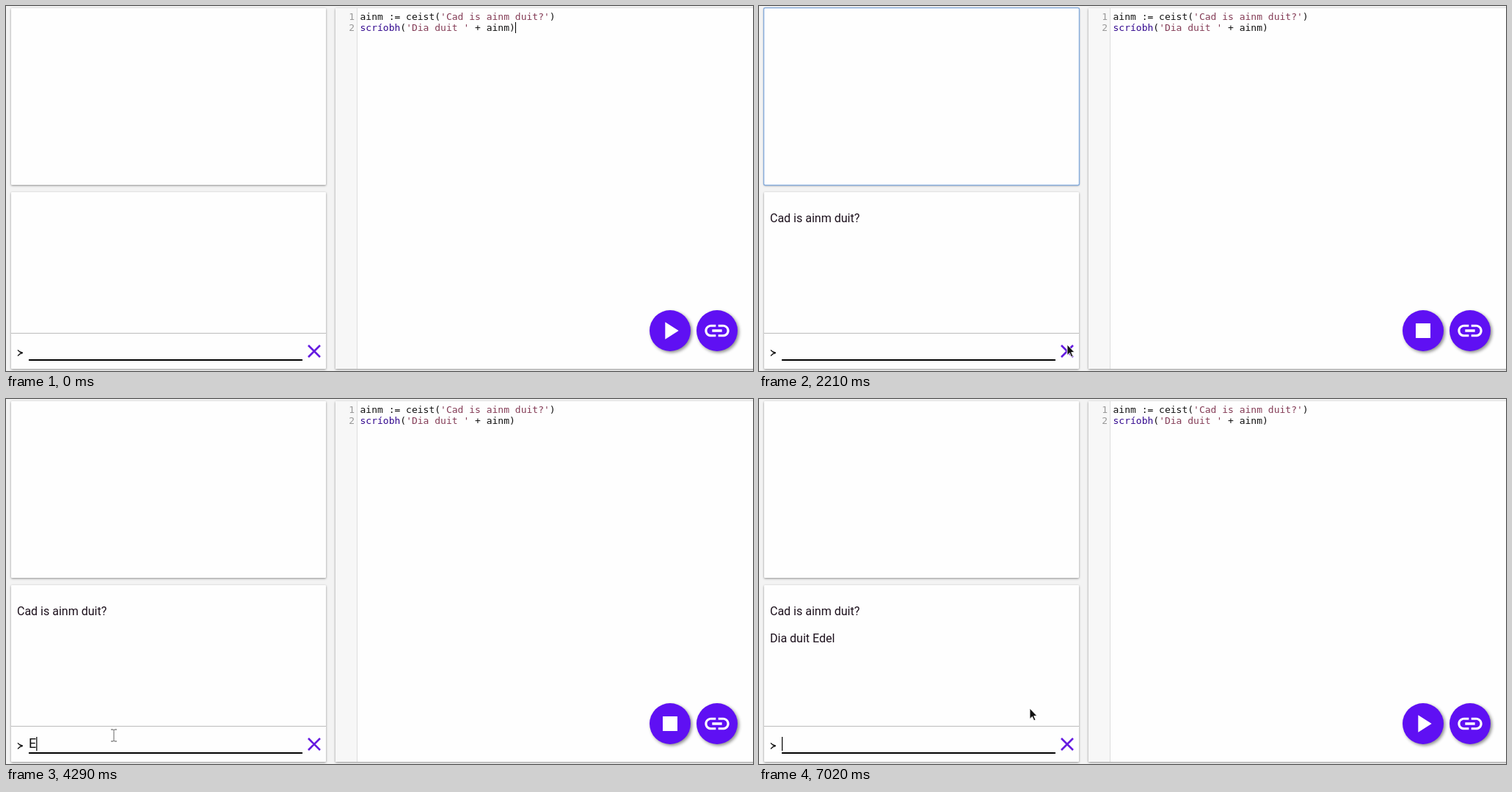
Animation of 1018 by 498 pixels, one loop 7.28 s. Source, as an HTML page:

```html
<!DOCTYPE html>
<html lang="ga">
<head>
<meta charset="utf-8">
<title>Code editor demo</title>
<style>
  html, body { margin: 0; width: 100%; height: 100%; overflow: hidden; background: #f3f3f3; }
  svg { display: block; width: 1018px; height: 498px; }
  .panel { fill: #fefefe; filter: drop-shadow(0 1px 1.5px rgba(0, 0, 0, .42)); }
  .code { font: 13px "DejaVu Sans Mono", monospace; fill: #111; }
  .num { fill: #999; text-anchor: end; }
  .str { fill: #843c56; }
  .fn { fill: #33098f; }
  .out { font: 16px Roboto, sans-serif; fill: #1c101c; }
  .in { font: 18px Roboto, sans-serif; fill: #111; }
  .btn circle { fill: #5f10f3; filter: drop-shadow(2px 2px 2px rgba(0, 0, 0, .45)); }
  .btn path { fill: #fff; }
  .btn.hover circle { fill: #9a44f3; }
  .btn.hover.run circle { fill: #8d40da; }
  .btn.hover.run path { fill: #e0e0e0; }
</style>
</head>
<body>
<svg viewBox="0 0 1018 498">
  <rect width="1018" height="498" fill="#f3f3f3"/>
  <rect class="panel" x="7" y="3" width="429" height="241" rx="1"/>
  <rect id="ring" x="6.5" y="2.5" width="430" height="242" rx="2" fill="none" stroke="#86acdc" stroke-width="1.4"/>
  <rect class="panel" x="7" y="254" width="429" height="241" rx="1"/>
  <rect class="panel" x="449" y="3" width="580" height="492" rx="1"/>

  <rect x="449" y="3" width="29" height="492" fill="#f7f7f7"/>
  <rect x="478" y="3" width="1" height="492" fill="#ddd"/>
  <g class="code">
    <text class="num" x="475" y="19">1</text>
    <text class="num" x="475" y="34">2</text>
    <text x="482.5" y="19">ainm := ceist(<tspan class="str">'Cad is ainm duit?'</tspan>)</text>
    <text x="482.5" y="34"><tspan class="fn">scríobh</tspan>(<tspan class="str">'Dia duit '</tspan> + ainm)</text>
  </g>
  <rect id="codeCaret" x="694" y="22" width="1" height="15"/>

  <text id="ask" class="out" x="15" y="295">Cad is ainm duit?</text>
  <text id="reply" class="out" x="15" y="332">Dia duit Edel</text>
  <rect x="7" y="446" width="429" height="1" fill="#bdbdbd"/>
  <path d="M16 469.3Q18.5 472.6 22.8 473.3Q18.5 474 16 477.3" fill="none" stroke="#111" stroke-width="1.4"/>
  <rect x="31" y="482" width="373" height="2"/>
  <text id="input" class="in" x="31" y="475.5"></text>
  <rect id="inputCaret" y="461" width="1.2" height="19"/>
  <path d="M412 463L428 479M428 463L412 479" stroke="#651be0" stroke-width="2.6"/>

  <g id="expand" class="btn" transform="translate(905 379)">
    <circle r="28"/>
    <path transform="scale(1.667) translate(-12 -12)" d="M7 14H5v5h5v-2H7v-3zm-2-4h2V7h3V5H5v5zm12 7h-3v2h5v-5h-2v3zM14 5v2h3v3h2V5h-5z"/>
  </g>
  <g id="play" class="btn" transform="translate(905 443)">
    <circle r="28"/>
    <path id="icon" transform="scale(1.667) translate(-12 -12)"/>
  </g>
  <g class="btn" transform="translate(969 443)">
    <circle r="28"/>
    <path transform="scale(1.667) translate(-12 -12)" d="M3.9 12c0-1.71 1.39-3.1 3.1-3.1h4V7H7c-2.76 0-5 2.24-5 5s2.24 5 5 5h4v-1.9H7c-1.71 0-3.1-1.39-3.1-3.1zM8 13h8v-2H8v2zm9-6h-4v1.9h4c1.71 0 3.1 1.39 3.1 3.1s-1.39 3.1-3.1 3.1h-4V17h4c2.76 0 5-2.24 5-5s-2.24-5-5-5z"/>
  </g>

  <g id="pointer">
    <path id="arrow" d="M0 0V14.5L3.4 11.4L5.7 16.8L8 15.8L5.7 10.6H10Z" fill="#111" stroke="#fff" stroke-width=".9"/>
    <path id="beam" d="M-4 -8H-1.5L0 -7L1.5 -8H4M0 -7V7M-4 8H-1.5L0 7L1.5 8H4" fill="none" stroke="#8a8a8a" stroke-width="1.3"/>
    <path id="hand" d="M-2 1Q-2 -.7 -.5 -.7Q1 -.7 1 1V6Q3.2 5 4 6.6Q6 6 6.6 7.6Q9 7.4 9 9.5V13Q9 15 7.6 16.5V19H-.5V17Q-3 14.5 -5 11Q-5.4 9 -3.6 9.2L-2 11Z" fill="#fff" stroke="#333" stroke-width="1.1"/>
  </g>
</svg>
<script>
const TICK = 130, TICKS = 56;
const PLAY = "M8 5v14l11-7z", STOP = "M6 6h12v12H6z";
const $ = id => document.getElementById(id);
const show = (id, on) => { $(id).style.display = on ? "" : "none"; };
const within = (t, ranges) => ranges.some(([from, to]) => t >= from && t < to);

// Pointer paths: [tick, x, y]; each path ends when the pointer hides.
const paths = [
  [[6, 770, 408], [7, 840, 430], [8, 880, 442], [10, 898, 449], [13, 898, 449],
   [14, 882, 452], [15, 800, 458], [16, 640, 462], [17, 420, 462], [18, 240, 460],
   [19, 147, 459], [36, 147, 459]],
  [[51, 180, 458], [52, 270, 446], [53, 335, 432], [54, 369, 422], [56, 369, 422]]
];
const typed = [[32, "E"], [36, "Ed"], [37, "Ede"], [38, "Edel"], [40, ""]];
const codeBlink = [[0, 1], [5, 9]];
const inputBlink = [[22, 24], [26, 31], [32, 46], [48, 51], [54, 56]];

function pointerAt(t) {
  const path = paths.find(p => t >= p[0][0] && t < p[p.length - 1][0]);
  if (!path) return null;
  const i = path.findIndex(p => p[0] > t);
  const [t0, x0, y0] = path[i - 1], [t1, x1, y1] = path[i];
  const k = (t - t0) / (t1 - t0);
  return { x: x0 + (x1 - x0) * k, y: y0 + (y1 - y0) * k };
}

function drawPointer(p, hover) {
  show("pointer", p);
  if (!p) return;
  const overText = p.x > 478 || (p.x > 31 && p.x < 404 && p.y > 456);
  const kind = hover ? "hand" : overText ? "beam" : "arrow";
  for (const id of ["hand", "beam", "arrow"]) show(id, id === kind);
  $("pointer").setAttribute("transform", `translate(${p.x} ${p.y})`);
}

function draw(t) {
  const p = pointerAt(t);
  const hover = !!p && Math.hypot(p.x - 905, p.y - 443) < 29;
  const running = within(t, [[11, 41]]);

  drawPointer(p, hover);
  show("expand", hover);
  $("play").classList.toggle("hover", hover);
  $("play").classList.toggle("run", running);
  $("icon").setAttribute("d", running ? STOP : PLAY);

  show("ring", within(t, [[11, 22]]));
  show("ask", t >= 12);
  show("reply", t >= 41);
  show("codeCaret", within(t, codeBlink));

  const entry = typed.filter(e => e[0] <= t).pop();
  $("input").textContent = entry ? entry[1] : "";
  $("inputCaret").setAttribute("x", 31 + $("input").getComputedTextLength());
  show("inputCaret", within(t, inputBlink));
}

const start = performance.now();
let last = -1;
function frame() {
  const t = Math.floor((performance.now() - start) / TICK) % TICKS;
  if (t !== last) draw(last = t);
  requestAnimationFrame(frame);
}
frame();
</script>
</body>
</html>
```
